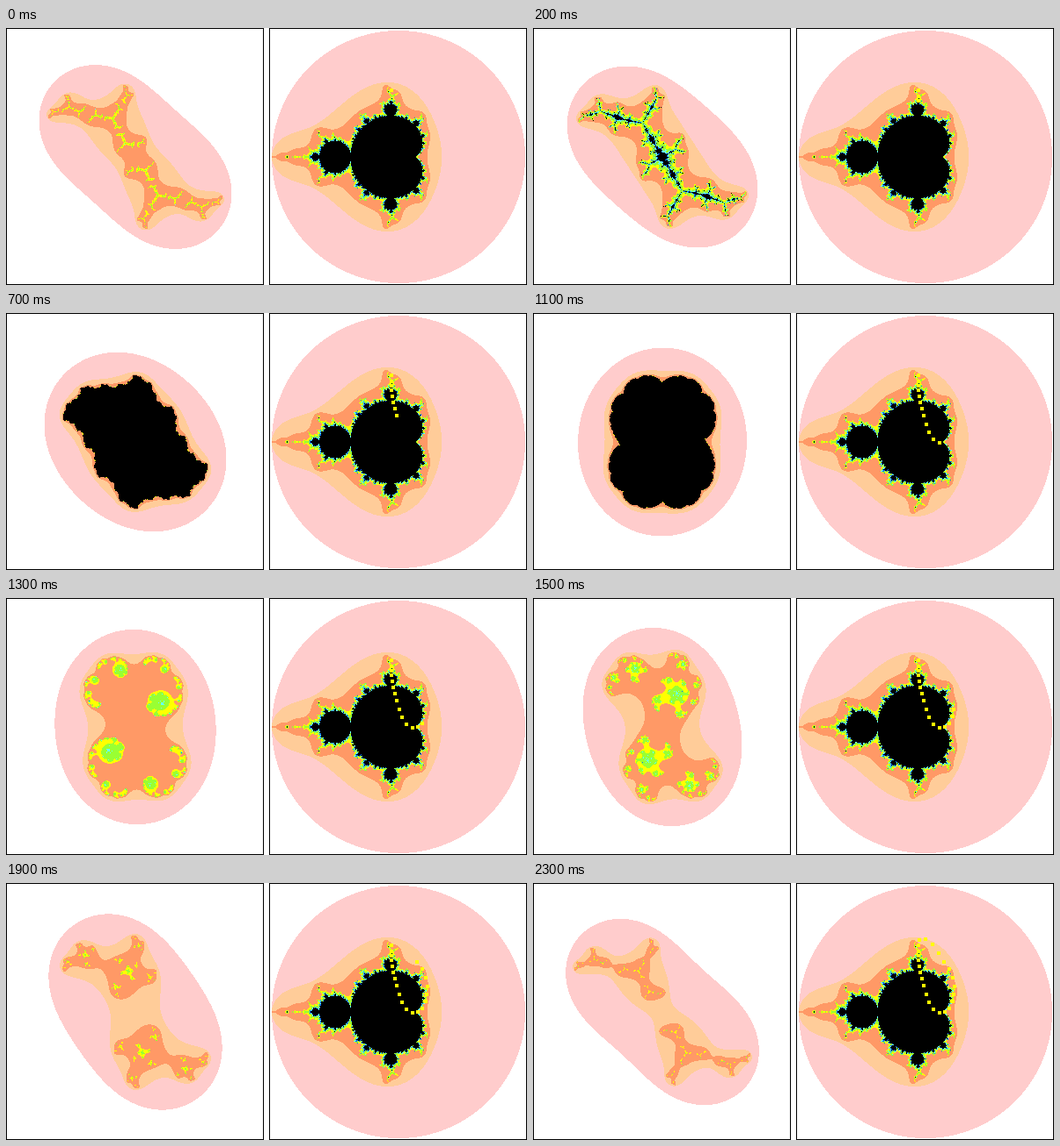
A matplotlib script for the animation above (2.4 s loop, 592x293 px).

```python
import numpy as np
import matplotlib.pyplot as plt
from matplotlib.animation import FuncAnimation

W, H = 592, 293          # stage in pixels
RIGHT = 299              # left edge of the right panel
MID, SCALE = 147, 72     # origin of the plane inside a panel, pixels per unit
MAX_ITER = 100

# Escape counts at which the next colour begins
LEVELS = [2, 4, 6, 12, 16, 30, 50, MAX_ITER]
COLORS = np.array([
    (255, 255, 255), (255, 204, 204), (255, 204, 153), (255, 153, 102),
    (255, 255, 0), (153, 255, 51), (102, 255, 255), (0, 102, 255), (0, 0, 0),
], dtype=np.uint8)
YELLOW = COLORS[4]

# Stops of the parameter c on its loop around the Mandelbrot set
PATH = [
    -.110 + 1.045j, -.110 + .958j, -.111 + .884j, -.110 + .807j,
    -.097 + .717j, -.083 + .620j, -.055 + .520j, -.026 + .414j,
    .014 + .276j, .062 + .152j, .130 + .041j, .224 - .018j,
    .313 - .005j, .382 + .055j, .438 + .160j, .455 + .276j,
    .460 + .400j, .431 + .538j, .375 + .674j, .294 + .788j,
    .210 + .928j, .112 + 1.065j, .007 + 1.148j, -.090 + 1.135j,
]

# Sample the plane at pixel centres
rows, cols = np.mgrid[0:H, 0:H] + 0.5
PLANE = (cols - MID) / SCALE + 1j * (MID - rows) / SCALE


def escape(z, c):
    """Iterate z*z + c and colour each point by its escape count."""
    z, c = (a.ravel() for a in np.broadcast_arrays(z, c))
    count = np.full(z.size, MAX_ITER)
    alive = np.arange(z.size)
    for n in range(1, MAX_ITER):
        z = z * z + c
        out = z.real ** 2 + z.imag ** 2 >= 4
        count[alive[out]] = n
        z, c, alive = z[~out], c[~out], alive[~out]
    return COLORS[np.digitize(count, LEVELS)].reshape(H, H, 3)


def add_border(img):
    img[[0, -1], :] = 0
    img[:, [0, -1]] = 0
    return img


def mark(img, c):
    x = int(MID + SCALE * c.real)
    y = int(MID - SCALE * c.imag)
    img[y - 2:y + 2, x - 2:x + 2] = YELLOW


MANDELBROT = escape(np.zeros_like(PLANE), PLANE)


def render(i):
    stage = np.full((H, W, 3), 255, dtype=np.uint8)
    stage[:, :H] = add_border(escape(PLANE, PATH[i]))
    trail = MANDELBROT.copy()
    for c in PATH[:i + 1]:
        mark(trail, c)
    stage[:, RIGHT:] = add_border(trail)
    return stage


fig = plt.figure(figsize=(W / 64, H / 64), dpi=64, facecolor="white")
ax = fig.add_axes([0, 0, 1, 1])
ax.axis("off")
picture = ax.imshow(render(0), interpolation="nearest", aspect="auto")


def update(i):
    picture.set_data(render(i))
    return [picture]


anim = FuncAnimation(fig, update, frames=len(PATH), interval=100,
                     repeat=True, repeat_delay=0)
plt.show()
```
